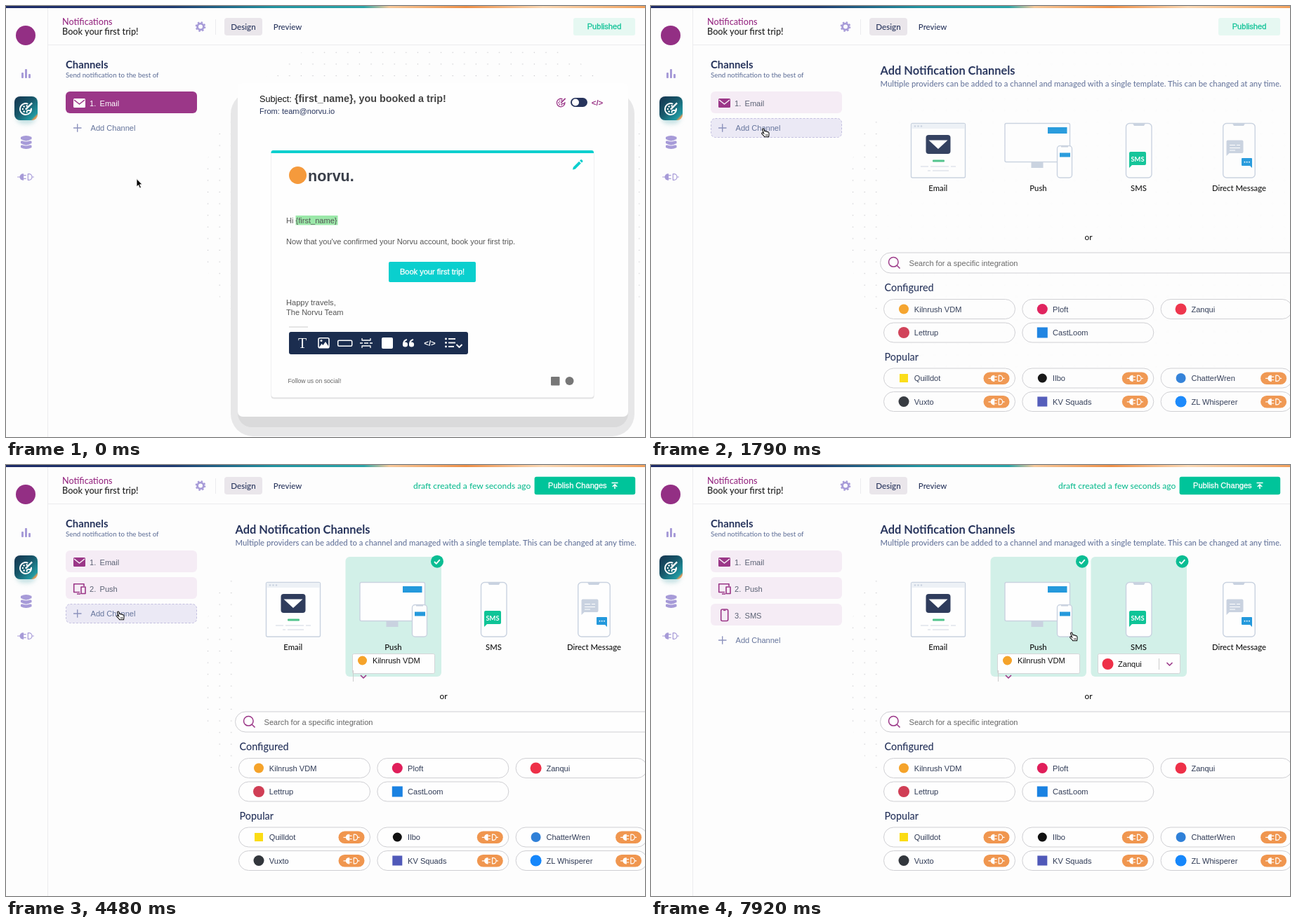
Recreate the animation shown at these times as an HTML page. Size 910 by 615 pixels, loop 8 s.

```html
<!DOCTYPE html>
<html lang="en">
<head>
<meta charset="utf-8">
<title>Notification channels</title>
<style>
html, body { margin: 0; width: 100%; height: 100%; overflow: hidden; background: #fdfdfd; }
svg { display: block; }
text { font: 11.07px "Liberation Sans", Arial, sans-serif; white-space: pre; }
.lato { font-family: Lato, "Open Sans", sans-serif; font-weight: 500; }
.bold { font-weight: 700; }
.mid { text-anchor: middle; }
.firm { stroke-width: .3px; }
</style>
</head>
<body>
<svg id="stage" width="910" height="615" viewBox="0 0 910 615">
  <defs>
    <linearGradient id="stripe">
      <stop offset="0" stop-color="#1c2a66"/><stop offset=".26" stop-color="#1f3a70"/>
      <stop offset=".42" stop-color="#2193a0"/><stop offset=".56" stop-color="#2aa5a8"/>
      <stop offset=".6" stop-color="#f7c99a"/><stop offset=".72" stop-color="#ee8f47"/>
      <stop offset=".84" stop-color="#fbd9b5"/><stop offset="1" stop-color="#f0a05c"/>
    </linearGradient>
    <linearGradient id="tile" x2="1" y2="1">
      <stop offset="0" stop-color="#173550"/><stop offset=".45" stop-color="#17576a"/>
      <stop offset=".84" stop-color="#219aa3"/><stop offset=".9" stop-color="#e79a57"/>
    </linearGradient>
    <pattern id="dots" x="296" y="58" width="16.6" height="16.6" patternUnits="userSpaceOnUse">
      <circle cx="8.2" cy="8.2" r=".75" fill="#c9c9cd"/>
    </pattern>
  </defs>
  <g id="scene"></g>
  <g id="cursor"></g>
</svg>
<script>
const STEP = 148.9, LAST = 53, LOOP = 8000;
const PAPER = '#fdfdfd', PURPLE = '#9b3788', LILAC = '#a79bd8', NAVY = '#27345c', SLATE = '#66759c',
      GREEN = '#00c49a', EDGE = '#c9d2e0', BLUE = '#2499dc', TEAL = '#0acfce';

const rect = (x, y, w, h, fill, r = 0, more = '') =>
  `<rect x="${x}" y="${y}" width="${w}" height="${h}" rx="${r}" fill="${fill}" ${more}/>`;
const disc = (x, y, r, fill, more = '') => `<circle cx="${x}" cy="${y}" r="${r}" fill="${fill}" ${more}/>`;
const fillPath = (d, fill) => `<path d="${d}" fill="${fill}"/>`;
const line = (d, color, w = 1) =>
  `<path d="${d}" fill="none" stroke="${color}" stroke-width="${w}" stroke-linejoin="round"/>`;
const text = (x, y, s, fill, cls = '', size = 11.07) =>
  `<text x="${x}" y="${y}" fill="${fill}" ${cls.includes('firm') ? `stroke="${fill}"` : ''} class="${cls}" style="font-size:${size}px">${s}</text>`;
const at = (x, y, body, scale = 1) => `<g transform="translate(${x} ${y}) scale(${scale})">${body}</g>`;
const stroke = (color, w = 1) => `stroke="${color}" stroke-width="${w}"`;

const plug = c => line('M-12.5 0h4M-3-2.4h3.700M-3 2.4h3.700M3.500-4.500h1.500a4.500 4.500 0 0 1 0 9h-1.500zM9.500 0h3', c, 1.3) +
  fillPath('M-3-5h-1a5 5 0 0 0 0 10h1z', c);
const palette = c => line('M6.500-1a7 7 0 1 1-4-5.300M6.500-1c.5 2.500-1.500 3-3.500 2.700s-2.500 1.500-1.700 3', c, 1.6) +
  line('M-.5.5L7.500-7.500', c, 2) +
  [[-4, 0], [-2.5, -3], [1, -4], [-2.5, 3]].map(p => disc(...p, 1.1, c)).join('');
const envelope = (body, flap) => rect(0, 0, 17, 13, body, 1.5) + line('M1 2l7.5 6 7.5-6', flap, 1.6);
const chevron = (x, y, c, w = 1.6) => line(`M${x - 4} ${y - 2}l4 4 4-4`, c, w);
const code = (x, y, c) => text(x, y, '&lt;/&gt;', c, 'mid bold', 11.5);

function frame() {
  return rect(0, 0, 910, 615, PAPER) +
    '<ellipse cx="607" cy="298" rx="334" ry="279" fill="url(#dots)"/>' +
    rect(0, 0, 910, 56, PAPER) + rect(0, 0, 910, 3, 'url(#stripe)') +
    line('M59.5 3V615M59 55.5H910', '#ececee') +
    disc(28, 42, 14, '#932f84') +
    rect(22, 95, 3, 8, LILAC, 1) + rect(27, 90, 3, 13, LILAC, 1) + rect(32, 97, 3, 6, LILAC, 1) +
    rect(15, 140, 27, 28, '#c3e0e2', 9, 'style="filter:blur(3px)"') +
    rect(12, 129, 33, 34, 'url(#tile)', 8) + at(28.5, 147, palette('#fff'), 1.15) +
    [187, 193, 199].map(y => fillPath(`M21 ${y}q7.5-4 15.5 0v3q-8 4-15.5 0z`, LILAC)).join('') +
    line('M21 191q7.5 4 15.5 0M21 197q7.5 4 15.5 0', PAPER) +
    at(28, 244, plug(LILAC), .95) +
    text(80, 27, 'Notifications', '#982c84', 'lato', 12.6) +
    text(80, 41, 'Book your first trip!', '#222', 'lato', 12.7) +
    disc(277, 29.5, 4.4, 'none', stroke(LILAC, 2.8)) +
    disc(277, 29.5, 6.3, 'none', stroke(LILAC, 2) + ' stroke-dasharray="2.47"') +
    line('M298.5 19V41', '#ececee') +
    rect(311, 17, 54, 25, '#eae6eb', 4) +
    text(338, 33.5, 'Design', NAVY, 'lato mid', 11.6) +
    text(401, 33.5, 'Preview', NAVY, 'lato mid', 11.4) +
    text(85, 89, 'Channels', NAVY, 'lato bold', 14.8) +
    text(85, 102, 'Send notification to the best of', SLATE, 'lato', 9.7);
}

function status(i) {
  if (i < 24) return rect(808, 17, 88, 25, '#e6f8f2', 3) + text(852, 33, 'Published', '#10c297', 'mid firm');
  return rect(752.6, 16.7, 143.6, 25.6, GREEN, 3) + text(772, 33, 'Publish Changes', '#fff', 'firm') +
    line('M862.5 25.5h9M867 34v-6M863.8 31l3.2-3.2 3.2 3.2', '#fff', 1.5) +
    (i >= 30 ? text(580, 33.5, 'draft created a few seconds ago', '#12bd92', 'lato', 12) : '');
}

function channels(i) {
  const active = i < 10, ink = active ? '#fff' : '#5b6274';
  const names = ['Email', 'Push', 'SMS'].slice(0, i >= 44 ? 3 : i >= 24 ? 2 : 1);
  const icons = [
    at(96, 132, active ? envelope('#fff', PURPLE) : envelope(PURPLE, '#f5ecf5')),
    line('M105 181.5H96.7V169.7H111V173M101 184h5M107 174h6v9.5h-6z', PURPLE, 1.6),
    rect(99.7, 206, 10, 16.5, 'none', 2, stroke(PURPLE, 1.6)) + line('M103 207.5h3.5', PURPLE, 1.2)
  ];
  let out = names.map((name, k) => {
    const y = 122 + 38 * k;
    return rect(85, y, 187, 31, active ? PURPLE : '#f5ecf5', 6) + icons[k] +
      text(119, y + 20.5, `${k + 1}.`, ink) + text(133.5, y + 20.5, name, ink);
  }).join('');
  const y = 122 + 38 * names.length;
  const hover = (i >= 5 && i < 16) || (i >= 29 && i < 37);
  if (hover) out += rect(85.5, y + .5, 186, 27, '#ebe9f5', 6, stroke('#c4c0e0') + ' stroke-dasharray="3 2"');
  else if (i === 37) out += rect(85, y, 187, 28, '#f1eef7', 6);
  return out + line(`M96 ${y + 14}h11.5M101.7 ${y + 8.2}v11.5`, '#8d93bd', 1.4) +
    text(120.5, y + 18, 'Add Channel', SLATE);
}

function email() {
  const gray = '#555', white = '#fff';
  return rect(320, 122, 575, 492, '#e7e7e8', 32) + rect(330, 128, 556, 473, '#dadadb', 20) +
    rect(330, 110, 556, 476, '#fefefe', 7) +
    text(361, 137, 'Subject:', '#111', '', 12.7) +
    text(411, 137, '{first_name}, you booked a trip!', '#444', 'bold', 14.34) +
    text(361, 154, 'From: team@norvu.io', NAVY) +
    at(790.5, 138, palette(PURPLE), .82) +
    rect(804, 131, 24, 13, NAVY, 6.5) + disc(811, 137.5, 5, white) + code(842, 142, PURPLE) +
    rect(377.5, 207, 460, 353.5, '#e2e2e3', 4) + rect(378, 207, 459, 351.5, '#fefefe', 4) +
    fillPath('M377.5 210v-1q0-3 3-3h453.5q3 0 3 3v1z', TEAL) +
    fillPath('M807 233.5l.8-3.6 8.2-8.2 2.8 2.8-8.2 8.2zM817 220.7l1.2-1.2q1-.8 2 0l.9.9q.8 1 0 2l-1.2 1.2z', TEAL) +
    disc(415.5, 241.5, 12.5, '#f59a3c') +
    text(430, 250, 'norvu.', '#3a3f4a', 'bold', 21.5) +
    rect(412.5, 299, 60, 13.5, '#9be8a9') +
    text(399, 310, 'Hi {first_name}', gray) +
    text(399, 340, "Now that you've confirmed your Norvu account, book your first trip.", gray) +
    rect(545, 365, 124, 29, TEAL, 2) + text(607, 383, 'Book your first trip!', white, 'mid firm') +
    text(399, 427, 'Happy travels,', gray) + text(399, 441, 'The Norvu Team', gray) +
    line('M403 458H430', '#ccc') +
    rect(403, 465, 255, 32, '#1b2d4f', 3) +
    `<text x="422" y="488" fill="#fff" class="mid" style="font:20px 'Liberation Serif',serif">T</text>` +
    rect(445, 473.7, 15, 14, 'none', 2, stroke(white, 1.6)) + disc(449, 477.5, 1.5, white) +
    fillPath('M446 487l3.5-5 2 2 3.5-5 4 6v2z', white) +
    rect(472.7, 477.2, 20, 8, 'none', 1.5, stroke(white, 1.5)) +
    line('M507 474v3h12v-3M507 488v-3h12v3M504 481h4m2 0h6m2 0h4', white, 1.3) +
    rect(535, 473, 16, 16, white, 2) +
    [566, 575].map(x => disc(x + 2.5, 483, 3.6, white) + line(`M${x} 483q0-6 5-7`, white, 2)).join('') +
    code(603.5, 485, white) +
    [475, 480.5, 486].map(y => disc(626.5, y, 1.4, white) + line(`M630 ${y}h${y > 481 ? 8 : 10}`, white, 1.8)).join('') +
    chevron(645.5, 485, white, 1.8) +
    text(401.5, 538, 'Follow us on social!', '#666', '', 8.7) +
    rect(776, 529, 12.5, 12.5, '#777', 1) + disc(802.5, 535, 6, '#777');
}

const cards = [['Email', 408.7], ['Push', 551.5], ['SMS', 694.5], ['Direct Message', 837.5]];

function artwork() {
  const box = (x, y, w, h, r) => rect(x, y, w, h, '#fefefe', r, stroke(EDGE, 1.4));
  return box(370.5, 167.5, 77, 77.5, 2) + rect(371, 168, 76, 7, '#edf1f6') +
    [376, 380.5, 385].map(x => disc(x, 171.5, 1.2, EDGE)).join('') +
    rect(391.5, 184, 35, 27, '#2f3c5c', 4) + fillPath('M395.5 191.500h27l-13.500 12.500z', '#fff') +
    rect(401, 219.5, 17, 3, '#4fc38a', 1) +
    line('M384 229h11m3 0h26m3 0h7M394 235h4m3 0h23', '#dfe4ec', 1.6) +
    box(504, 167.5, 92.5, 55, 2) + rect(565, 173, 27.5, 9, BLUE) + rect(541.5, 223, 17, 8, EDGE) +
    box(578.5, 199.5, 21, 45.5, 4) + rect(584, 199.5, 10, 2, EDGE) + rect(582, 209.5, 15, 6, BLUE) +
    box(676.5, 167.5, 36.5, 77.5, 5) + fillPath('M686 167.5h18l-2 3.5h-14z', EDGE) +
    fillPath('M683 208h20q2 0 2 2v15q0 2-2 2h-18l-4 4v-21q0-2 2-2z', '#0fc497') +
    text(693, 221.5, 'SMS', '#fff', 'lato bold mid', 9.3) +
    box(814.7, 167.5, 45.5, 77.5, 5) + fillPath('M828 167.5h18l-2 3.5h-14z', EDGE) +
    fillPath('M821.5 191.5h20q2 0 2 2v14.5q0 2-2 2h-18l-4 4v-20.5q0-2 2-2z', EDGE) +
    line('M824 198.5h8m2 0h5M824 202.5h15M824 206h8', '#fff', 1.2) +
    fillPath('M842 217h13q1 0 1 1v13l-3-3h-11q-1 0-1-1v-9q0-1 1-1z', BLUE) +
    [845.5, 848.7, 852].map(x => disc(x, 222.7, .9, '#fff')).join('');
}

// name, square icon?, icon colour, icon radius; rows of up to three
const integrations = [
  [432.5, [['Kilnrush VDM', 0, '#f5a32a', 7], ['Ploft', 0, '#e01e5a', 7.5], ['Zanqui', 0, '#ee3048', 8]]],
  [466, [['Lettrup', 0, '#d03e55', 8], ['CastLoom', 1, '#1a82e2', 7.5]]],
  [531, [['Quilldot', 1, '#fbdc14', 6], ['Ilbo', 0, '#111', 6.5], ['ChatterWren', 0, '#2f80d8', 7]]],
  [564.5, [['Vuxto', 0, '#32363c', 7.5], ['KV Squads', 1, '#5059b9', 7], ['ZL Whisperer', 0, '#1687fb', 8]]]
];
const icon = (x, y, square, color, r) =>
  square ? rect(x - r, y - r, 2 * r, 2 * r, color) : disc(x, y, r, color);

const pills = () => integrations.map(([cy, row], k) => row.map(([name, square, color, r], c) => {
  const x = 331.5 + 197.3 * c;
  return rect(x, cy - 14, 187, 28, '#fefefe', 14, stroke('#cfcfd3')) +
    icon(x + 28.5, cy, square, color, r) + text(x + 43.3, cy + 4, name, '#2f3a55') +
    (k > 1 ? rect(x + 142, cy - 8.5, 37, 17.5, '#f0964f', 8.7) + at(x + 160.5, cy + .3, plug('#fff'), .92) : '');
}).join('')).join('');

const check = x => disc(x, 137.7, 9, '#0bbd93') + line(`M${x - 4} 138l2.8 2.9 5-5.7`, '#fff', 1.8);

function picker(i, x, y) {
  const picked = [false, i >= 23, i >= 44, false];
  const tiles = cards.map(([, cx], k) => {
    const left = cx - 68, over = y < 302 && x >= left && x < left + 136.5;
    return picked[k] || over ? rect(left, 131, 136.5, 171, picked[k] ? '#d2f0e8' : '#ededef', 6) : '';
  }).join('');
  const alpha = [.28, .7, .97][i - 10] ?? 1, shift = [11, 4][i - 10] ?? 0;
  return `<g opacity="${alpha}" transform="translate(0 ${shift})">` +
    rect(326, 57, 584, 558, PAPER) +
    text(326.5, 98, 'Add Notification Channels', NAVY, 'lato bold', 16.4) +
    text(326.5, 114.5, 'Multiple providers can be added to a channel and managed with a single template. This can be changed at any time.', SLATE, 'lato', 11.32) +
    tiles + artwork() +
    cards.map(([name, cx]) => text(cx, 263.5, name, '#111', 'lato mid', 11.3)).join('') +
    (picked[1] ? check(614) + rect(493.5, 269.5, 117, 28, '#fefefe', 2, stroke('#d5d5d8')) +
      disc(507.5, 279, 6.5, '#f5a32a') + text(522, 283, 'Kilnrush VDM', '#111') +
      line('M494.5 293V309', '#ccc') + chevron(509, 302, PURPLE) : '') +
    (picked[2] ? check(756.5) + rect(636.5, 269.5, 117, 28, '#fefefe', 2, stroke('#d5d5d8')) +
      disc(650.5, 284, 8, '#ee3048') + text(665, 288, 'Zanqui', '#111') +
      line('M723.5 276V292', '#ccc') + chevron(738.5, 284, PURPLE) : '') +
    text(623, 333.5, 'or', '#111', 'lato mid', 11.8) +
    rect(326.5, 352, 610, 29, '#fefefe', 14.5, stroke('#cfcfd3')) +
    disc(345.3, 365.3, 6.8, 'none', stroke(PURPLE, 1.5)) + line('M350 370l4.5 4.5', PURPLE, 1.6) +
    text(367.5, 370.5, 'Search for a specific integration', '#666') +
    text(332.5, 407, 'Configured', NAVY, 'lato', 14.4) +
    text(332.5, 505.5, 'Popular', NAVY, 'lato', 14.4) +
    pills() + '</g>';
}

// cursor legs: first step, last step, destination
const legs = [[0, 3, 170, 189], [4, 6, 163, 181], [14, 20, 540, 206],
              [25, 30, 163, 215], [34, 40.6, 721, 254], [50, 53, 602, 245]];
function pointer(i) {
  let x = 189.5, y = 253;
  for (const [from, to, tx, ty] of legs) {
    const u = Math.min(1, Math.max(0, (i - from) / (to - from))), e = u * u * (3 - 2 * u);
    x += (tx - x) * e;
    y += (ty - y) * e;
  }
  return [x, y];
}
const ARROW = '<path d="M-3.5-6.5v11.5l2.6-2.4 1.9 4.3 2-.9-1.9-4.2h3.5z" fill="#000" stroke="#fff" stroke-width=".9"/>';
const HAND = '<path d="M-4.3-5.5c.7-.9 1.9-.5 2.2.5l.8 2.6c.9-.6 1.8-.2 2.1.5.9-.5 1.8-.1 2.1.7 1-.4 1.8.2 2 1.1.5 2-.2 3.5-.3 5.9h-5.9c-.9-1.9-2.8-2.9-3.9-4.6-.5-1 .7-1.8 1.7-1.2l1.1.8-1.9-5c-.2-.6-.2-1 0-1.3z" fill="#fff" stroke="#111" stroke-width="1.1"/>' +
  line('M.8 2v2.5M2.6 2v2.5', '#111', .8);

const scene = document.getElementById('scene'), cursor = document.getElementById('cursor');
let shown = -1;
function draw() {
  const i = Math.min(LAST, Math.floor(performance.now() % LOOP / STEP));
  if (i !== shown) {
    shown = i;
    const [x, y] = pointer(i);
    scene.innerHTML = frame() + status(i) + channels(i) + (i < 10 ? email() : picker(i, x, y));
    cursor.innerHTML = at(x, y, i >= 5 && (x < 272 || x > 340) ? HAND : ARROW);
  }
  requestAnimationFrame(draw);
}
draw();
</script>
</body>
</html>
```
